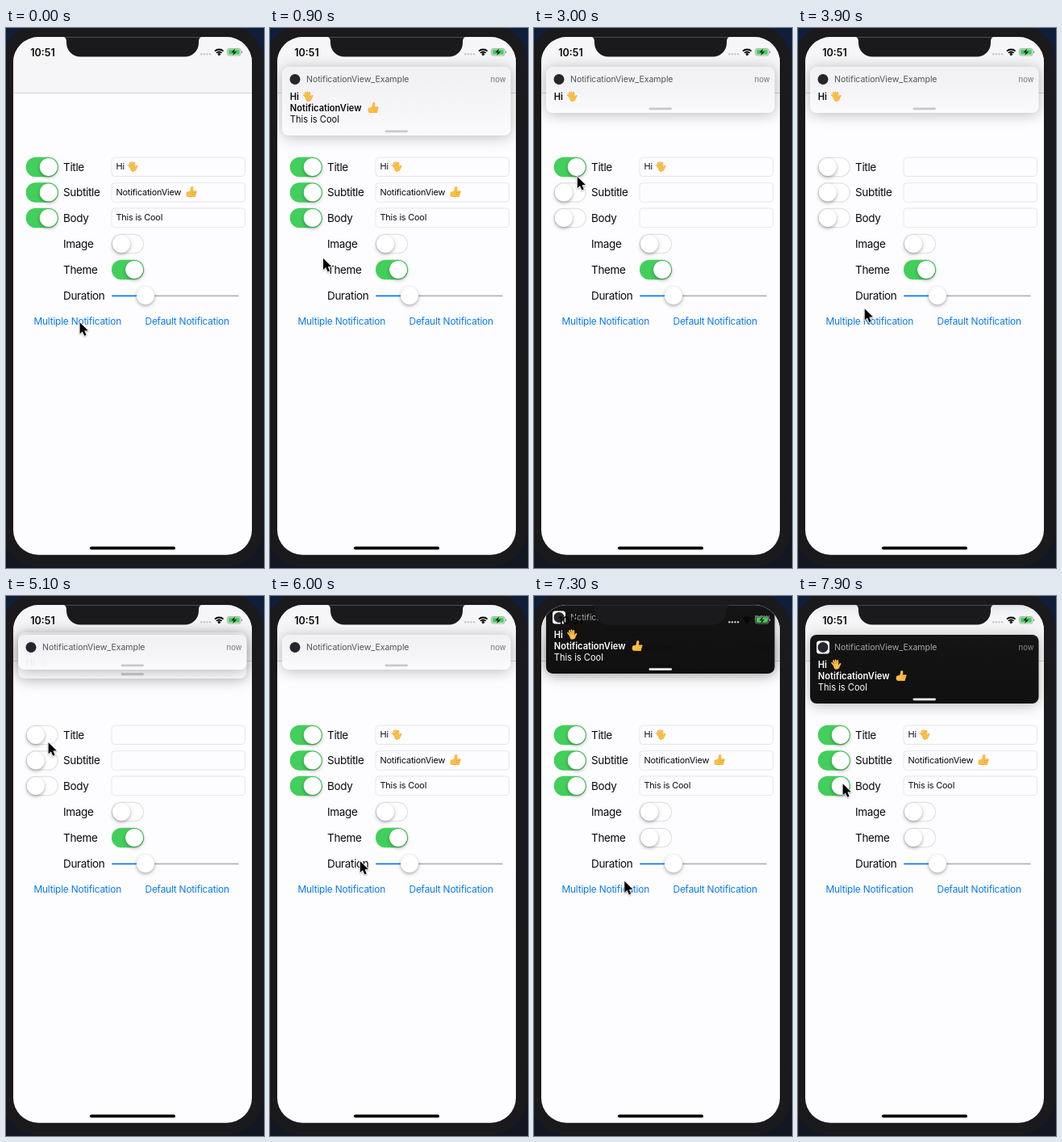
An HTML page with a canvas that plays this animation: 320 by 668 pixels, repeating every 8000 ms.

```html
<!DOCTYPE html>
<html lang="en">
<head>
<meta charset="utf-8">
<title>Notification demo</title>
<style>
html, body { margin: 0; width: 100%; height: 100%; overflow: hidden; background: #1a191c; }
canvas { display: block; width: 320px; height: 668px; }
</style>
</head>
<body>
<canvas id="stage"></canvas>
<script>
const W = 320, H = 668, LOOP = 8000;
const GREEN = '#43cf5b', BLUE = '#0a7aee', INK = '#0a0a0c';
const canvas = document.getElementById('stage');
const ctx = canvas.getContext('2d');
const dpr = window.devicePixelRatio || 1;
canvas.width = W * dpr;
canvas.height = H * dpr;

const ease = p => { p = Math.min(1, Math.max(0, p)); return p * p * (3 - 2 * p); };

function box(x, y, w, h, r) {
  ctx.beginPath();
  ctx.roundRect(x, y, w, h, r);
}

function disc(x, y, r, color) {
  ctx.beginPath();
  ctx.arc(x, y, r, 0, 7);
  ctx.fillStyle = color;
  ctx.fill();
}

function shadow(color, blur, dy) {
  ctx.shadowColor = color;
  ctx.shadowBlur = blur * dpr;
  ctx.shadowOffsetY = dy * dpr;
}

// y is the middle of the capitals
function text(s, x, y, size, color, weight = 400, spacing = 0) {
  ctx.font = `${weight} ${size}px Inter, Roboto, sans-serif`;
  ctx.letterSpacing = spacing + 'px';
  ctx.fillStyle = color;
  ctx.fillText(s, x, y + size * 0.36);
}

function stroke(color, width, points) {
  ctx.beginPath();
  points.forEach(([x, y]) => ctx.lineTo(x, y));
  ctx.strokeStyle = color;
  ctx.lineWidth = width;
  ctx.lineCap = ctx.lineJoin = 'round';
  ctx.stroke();
}

function wave(x, y) {
  ctx.save();
  ctx.translate(x, y);
  ctx.rotate(-0.3);
  for (const [color, grow] of [['#e39a2c', 0.5], ['#fdc044', 0]]) {
    for (const [fx, fy, tx, ty] of [[-2.2, 1, -4, -3.2], [-0.8, 0, -1.6, -5.2], [0.9, 0, 1, -5.2], [2.2, 1, 3.5, -3.8], [2, 4, 5.4, 0.9]])
      stroke(color, 1.45 + grow, [[fx, fy], [tx, ty]]);
    box(-3.2 - grow / 2, 0, 6.4 + grow, 5.8 + grow / 2, 2.8);
    ctx.fillStyle = color;
    ctx.fill();
  }
  ctx.restore();
}

function thumb(x, y) {
  ctx.save();
  ctx.translate(x, y);
  for (const [color, grow] of [['#e39a2c', 0.6], ['#fdc044', 0]]) {
    stroke(color, 2.7 + grow, [[-1.5, 1], [0.2, -1.5], [0.8, -5]]);
    box(-6 - grow / 2, -0.6, 8.5 + grow, 6.2 + grow / 2, 2.4);
    ctx.fillStyle = color;
    ctx.fill();
  }
  for (let i = 0; i < 4; i++) {
    const fy = -0.4 + i * 1.8, end = 5.6 - i * 0.55;
    stroke('#e39a2c', 2.1, [[1.5, fy], [end, fy]]);
    stroke('#fdc044', 1.5, [[1.2, fy], [end, fy]]);
  }
  ctx.restore();
}

function knob(x, y) {
  ctx.save();
  shadow('rgba(0,0,0,.33)', 4.5, 1.8);
  disc(x, y, 11, '#fff');
  ctx.restore();
}

// on: 0..1
function toggle(x, y, on) {
  box(x - 19.5, y - 11.7, 39, 23.4, 11.7);
  ctx.fillStyle = '#fff';
  ctx.fill();
  ctx.strokeStyle = '#e2e2e4';
  ctx.lineWidth = 1.3;
  ctx.stroke();
  ctx.globalAlpha = on;
  box(x - 20.1, y - 12.2, 40.2, 24.4, 12.2);
  ctx.fillStyle = GREEN;
  ctx.fill();
  ctx.globalAlpha = 1;
  knob(x - 8 + 16 * on, y);
}

// Each switch: start state, then the times it flips
const switches = {
  title: [1, 3150, 5150],
  subtitle: [1, 1420, 5380],
  body: [1, 1150, 5630],
  image: [0],
  theme: [1, 6550]
};

function level(name, t) {
  const [start, ...flips] = switches[name];
  let v = start;
  for (const f of flips) if (t >= f) v = v > 0.5 ? 1 - ease((t - f) / 220) : ease((t - f) / 220);
  return v;
}

function isOn(name, t) {
  const [start, ...flips] = switches[name];
  return (start + flips.filter(f => t >= f).length) % 2 === 1;
}

const rows = [['title', 'Title', 172], ['subtitle', 'Subtitle', 203.5], ['body', 'Body', 235]];

const label = (s, y) => text(s, 71, y, 13.5, INK, 400, -0.33);

function form(t) {
  ctx.fillStyle = '#fdfcfe';
  ctx.fillRect(0, 0, W, H);
  ctx.fillStyle = '#f6f5f7';
  ctx.fillRect(9, 10, 297, 70);
  ctx.fillStyle = '#cbcacd';
  ctx.fillRect(9, 80, 297, 0.8);

  for (const [name, title, y] of rows) {
    toggle(44.8, y, level(name, t));
    label(title, y);
    box(131, y - 12, 165.5, 23.5, 4);
    ctx.strokeStyle = '#e7e6e9';
    ctx.lineWidth = 1;
    ctx.stroke();
    if (!isOn(name, t)) continue;
    const value = { title: 'Hi', subtitle: 'NotificationView', body: 'This is Cool' }[name];
    text(value, 136.5, y - 0.6, 10.9, INK, 400, -0.2);
    if (name === 'title') wave(157, y - 0.5);
    if (name === 'subtitle') thumb(230, y - 0.5);
  }
  label('Image', 267);
  toggle(151.1, 267, level('image', t));
  label('Theme', 299);
  toggle(151.1, 299, level('theme', t));

  label('Duration', 331);
  stroke('#b5b4b7', 1.7, [[173, 331.3], [288, 331.3]]);
  stroke('#0a7cff', 1.7, [[132, 331.3], [173, 331.3]]);
  knob(173, 331);
  text('Multiple Notification', 34.5, 362.5, 11.9, BLUE, 400, -0.2);
  text('Default Notification', 172.5, 362.5, 11.9, BLUE, 400, -0.2);

  box(104, 641.5, 106, 3.8, 1.9);
  ctx.fillStyle = '#000';
  ctx.fill();
}

const SLIDE = 500;
const cards = [
  { enter: 150, leave: 2405, bottom: 133, lines: 3 },
  { enter: 1905, leave: 5050, bottom: 105, lines: 1 },
  { enter: 4550, leave: 7475, bottom: 91, lines: 0 },
  { enter: 6975, leave: 1e9, bottom: 133, lines: 3, dark: true }
];

function card({ enter, leave, bottom, lines, dark }, t) {
  if (t < enter || t > leave + SLIDE) return;
  const shown = ease((t - enter) / SLIDE) - ease((t - leave) / SLIDE);
  const ink = dark ? '#fff' : INK;
  ctx.save();
  ctx.translate(0, -bottom * (1 - shown));

  ctx.save();
  shadow('rgba(0,0,0,.28)', 17, 2);
  const fill = ctx.createLinearGradient(0, 48, 0, bottom);
  fill.addColorStop(0, dark ? 'rgba(13,13,14,.96)' : 'rgba(243,242,245,.95)');
  fill.addColorStop(1, dark ? 'rgba(9,9,10,.96)' : 'rgba(253,252,254,.95)');
  ctx.fillStyle = fill;
  box(15, 48, 283.5, bottom - 48, 8);
  ctx.fill();
  ctx.restore();

  if (dark) {
    box(23, 55.5, 16, 16, 3.5);
    ctx.fillStyle = '#fff';
    ctx.fill();
  }
  disc(31, 63.5, 6.5, '#25262d');
  text('NotificationView_Example', 45, 63.5, 10.6, dark ? '#a6a6a8' : '#555458', 400, -0.08);
  text('now', 273.5, 63.5, 9.6, dark ? '#89898b' : '#77767a');
  if (lines > 0) {
    text('Hi', 24.8, 85, 11.1, ink, 600);
    wave(47, 84.7);
  }
  if (lines > 1) {
    text('NotificationView', 24.8, 99.2, 11.1, ink, 600);
    thumb(128, 99);
    text('This is Cool', 24.8, 113.3, 11.1, ink);
  }
  box(142.5, bottom - 6.6, 28.5, 2.8, 1.4);
  ctx.fillStyle = dark ? '#f2f2f2' : '#c9c8cb';
  ctx.fill();
  ctx.restore();
}

function statusBar() {
  text('10:51', 30.3, 30, 12.5, '#050506', 600);
  for (let i = 0; i < 4; i++) disc(242.3 + i * 3.6, 32.3, 1.2, '#c6c5c8');
  ctx.strokeStyle = '#050506';
  ctx.lineCap = 'butt';
  ctx.lineWidth = 1.9;
  for (const r of [4.5, 7.5]) {
    ctx.beginPath();
    ctx.arc(264.3, 34, r, -Math.PI * 0.75, -Math.PI * 0.25);
    ctx.stroke();
  }
  disc(264.3, 32.4, 1.6, '#050506');
  box(274.5, 25.4, 16.6, 8.6, 2.4);
  ctx.strokeStyle = '#8f9a91';
  ctx.lineWidth = 0.8;
  ctx.stroke();
  box(275.8, 26.6, 14, 6.2, 1.4);
  ctx.fillStyle = GREEN;
  ctx.fill();
  box(292, 28.2, 1.2, 3, 0.6);
  ctx.fillStyle = '#8f9a91';
  ctx.fill();
  ctx.beginPath();
  for (const [x, y] of [[284, 25.5], [279.5, 30.2], [282.4, 30.2], [281.4, 34], [286, 29.2], [283, 29.2]]) ctx.lineTo(x, y);
  ctx.fillStyle = '#08160b';
  ctx.fill();
}

function notch() {
  ctx.beginPath();
  ctx.moveTo(69, 10);
  ctx.quadraticCurveTo(75, 11, 75, 17);
  ctx.arcTo(75, 35.5, 93, 35.5, 17);
  ctx.arcTo(239, 35.5, 239, 17, 17);
  ctx.lineTo(239, 17);
  ctx.quadraticCurveTo(239, 11, 245, 10);
  ctx.fillStyle = '#1a191c';
  ctx.fill();
}

// Pointer way points: time, x, y
const path = [
  [0, 91, 363], [650, 91, 363], [1080, 50, 236], [1180, 50, 236], [1370, 50, 206], [1480, 50, 206],
  [1850, 85, 363], [2620, 85, 364], [3050, 52, 176], [3250, 52, 176], [4015, 84, 357],
  [4650, 84, 357], [5100, 52, 180], [5180, 52, 180], [5350, 52, 208], [5410, 52, 208],
  [5590, 52, 238], [5650, 52, 238], [6130, 124, 346], [6220, 124, 346], [6500, 152, 303],
  [6600, 152, 303], [6900, 117, 363], [7180, 117, 363], [7850, 55, 231], [LOOP, 55, 231]
];

function pointer(t) {
  const i = path.findIndex(p => p[0] > t);
  const [t0, x0, y0] = path[i - 1], [t1, x1, y1] = path[i];
  const k = ease((t - t0) / (t1 - t0));
  ctx.save();
  ctx.translate(x0 + (x1 - x0) * k + 0.6, y0 + (y1 - y0) * k + 1.2);
  ctx.scale(0.88, 0.88);
  ctx.beginPath();
  for (const [x, y] of [[0, 0], [0, 16], [3.7, 12.7], [6.4, 18.8], [9.1, 17.6], [6.5, 11.7], [11.6, 11.4]]) ctx.lineTo(x, y);
  ctx.closePath();
  ctx.save();
  shadow('rgba(0,0,0,.3)', 2, 1);
  ctx.strokeStyle = '#fff';
  ctx.lineWidth = 1.8;
  ctx.lineJoin = 'round';
  ctx.stroke();
  ctx.restore();
  ctx.fillStyle = '#000';
  ctx.fill();
  ctx.restore();
}

function draw(t) {
  ctx.setTransform(dpr, 0, 0, dpr, 0, 0);
  const desk = ctx.createLinearGradient(0, 0, 0, H);
  desk.addColorStop(0, '#0f1e3b');
  desk.addColorStop(1, '#131722');
  ctx.fillStyle = desk;
  ctx.fillRect(0, 0, W, H);
  box(-6, -5, 325.5, 672, 48);
  ctx.fillStyle = '#1a191c';
  ctx.fill();

  ctx.save();
  box(9, 11.3, 296, 640.4, 31);
  ctx.clip();
  form(t);
  cards.forEach(c => card(c, t));
  statusBar();
  notch();
  ctx.restore();
  pointer(t);
}

function frame(now) {
  draw(now % LOOP);
  requestAnimationFrame(frame);
}
draw(0);
requestAnimationFrame(frame);
</script>
</body>
</html>
```
